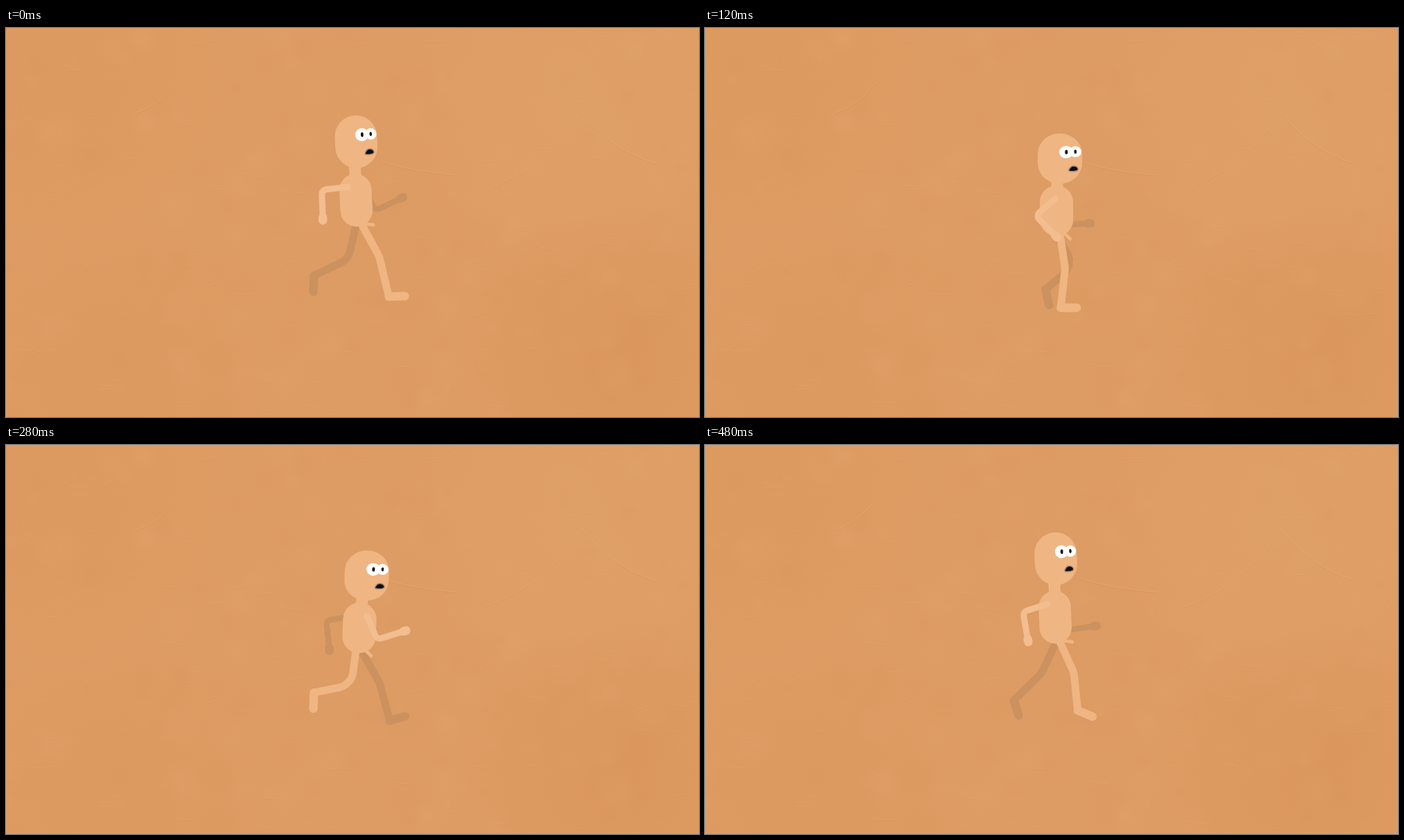
Animation of 998x561 px, one loop 0.52 s. Source, as an HTML page with a canvas:

```html
<!DOCTYPE html>
<html lang="en">
<head>
<meta charset="utf-8">
<title>Runner</title>
<style>
  html, body { margin: 0; width: 100%; height: 100%; overflow: hidden; background: #dd9b62; }
  canvas { display: block; }
</style>
</head>
<body>
<canvas id="stage" width="998" height="561"></canvas>
<script>
const W = 998, H = 561, STEPS = 13, STEP_MS = 40;
const GROUND = 403.5, THIGH = 48, SHIN = 55, UPPER_ARM = 37.5, FOREARM = 42;
const SKIN = '#efb582', ARM = '#f2be90', SHADE = '#cb9260';
const ctx = document.getElementById('stage').getContext('2d');

const rad = degrees => degrees * Math.PI / 180;
// Cosine over the run cycle that is 1 at step `peak`.
const wave = (step, peak, harmonic = 1, period = STEPS) =>
  Math.cos(2 * Math.PI * harmonic * (step - peak) / period);
// Point at a distance from [x, y]; angle 0 points down, 90 degrees forward.
const reach = ([x, y], angle, length) =>
  [x + length * Math.sin(angle), y + length * Math.cos(angle)];

// Line through two points, or two bones with a rounded joint.
function limb(points, width, color, radius = 0, cap = 'round') {
  const end = points[points.length - 1];
  ctx.beginPath();
  ctx.moveTo(...points[0]);
  if (points.length > 2) ctx.arcTo(...points[1], ...end, radius);
  ctx.lineTo(...end);
  ctx.lineWidth = width;
  ctx.lineCap = cap;
  ctx.strokeStyle = color;
  ctx.stroke();
}

function oval(x, y, rx, ry, color) {
  ctx.beginPath();
  ctx.ellipse(x, y, rx, ry, 0, 0, 2 * Math.PI);
  ctx.fillStyle = color;
  ctx.fill();
}

function capsule(w, h) {
  ctx.beginPath();
  ctx.roundRect(-w / 2, -h / 2, w, h, w / 2);
  ctx.fillStyle = SKIN;
  ctx.fill();
}

// The ankle follows a flattened loop; the knee bends forward to fit.
function leg(step, hipY, color) {
  const hip = [508.5 + 5 * wave(step, 1), hipY];
  const lift = 384.3 + 23.2 * wave(step, 2) + 10.2 * wave(step, 3.43, 2);
  const grounded = lift > GROUND;
  const ankle = [
    495.9 + 55.3 * wave(step, 0.38) + 4.1 * wave(step, 1.34, 2),
    Math.min(lift, GROUND)
  ];
  const dx = ankle[0] - hip[0], dy = ankle[1] - hip[1], d = Math.hypot(dx, dy);
  const stretch = Math.max(1, d / (THIGH + SHIN));
  const cosine = (THIGH ** 2 + d * d - SHIN ** 2) / (2 * THIGH * d);
  const bend = Math.max(0.14, Math.acos(Math.min(1, cosine)));
  const knee = reach(hip, Math.atan2(dx, dy) + bend, THIGH * stretch);
  const pitch = grounded ? 0 : 40.8 + 59.6 * wave(step, 8.1);
  limb([hip, knee, ankle], 11, color, 25);
  limb([ankle, reach(ankle, rad(90 - pitch), 23)], 12.3, color);
}

function arm(shoulder, upper, fore, width, color) {
  const elbow = reach(shoulder, rad(upper), UPPER_ARM);
  const hand = reach(elbow, rad(fore), FOREARM);
  limb([shoulder, elbow, hand], width, color, 7);
  limb([reach(hand, rad(fore), -2), reach(hand, rad(fore), 2)], 12.5, color);
}

function head(x, top, bottom, width, lean) {
  ctx.save();
  ctx.translate(x, (top + bottom) / 2);
  ctx.scale(width / 61, (bottom - top) / 76);
  ctx.rotate(lean);
  capsule(61, 76);
  oval(8.7, -9.7, 9.7, 9.4, '#fff');
  oval(21.4, -10.2, 8.3, 8.2, '#fff');
  oval(9, -9.8, 1.9, 3.3, '#06090f');
  oval(21.4, -10.2, 1.7, 3, '#06090f');
  ctx.beginPath();
  ctx.moveTo(12, 17.6);
  ctx.quadraticCurveTo(14.5, 11, 19, 11.2);
  ctx.quadraticCurveTo(24, 11.4, 25.2, 16);
  ctx.quadraticCurveTo(24.5, 19.3, 17.5, 19.3);
  ctx.quadraticCurveTo(12, 19.5, 12, 17.6);
  ctx.fillStyle = '#04101f';
  ctx.fill();
  ctx.lineWidth = 1.5;
  ctx.strokeStyle = '#b08560';
  ctx.stroke();
  ctx.restore();
}

function makePaper() {
  const paper = document.createElement('canvas');
  paper.width = W;
  paper.height = H;
  const p = paper.getContext('2d');
  let seed = 7;
  const random = () => (seed = seed * 16807 % 2147483647) / 2147483647;

  p.fillStyle = '#dd9c63';
  p.fillRect(0, 0, W, H);
  const blotch = (x, y, r, rgb, alpha) => {
    const g = p.createRadialGradient(x, y, 0, x, y, r);
    g.addColorStop(0, `rgba(${rgb},${alpha})`);
    g.addColorStop(1, `rgba(${rgb},0)`);
    p.fillStyle = g;
    p.fillRect(x - r, y - r, 2 * r, 2 * r);
  };
  blotch(840, 110, 280, '226,166,110', 0.4);
  blotch(880, 470, 220, '214,140,84', 0.4);
  blotch(60, 60, 260, '219,150,91', 0.4);
  blotch(150, 500, 230, '217,147,90', 0.3);
  const tones = ['229,171,116', '211,142,86'];
  for (let i = 0; i < 200; i++) {
    blotch(random() * W, random() * H, 8 + random() * 32, tones[i % 2], 0.1);
  }

  const crease = (x, y, dx, dy, rgb, alpha) => {
    p.beginPath();
    p.moveTo(x, y);
    p.quadraticCurveTo(x + dx * 0.4, y + dy * 0.75, x + dx, y + dy);
    p.strokeStyle = `rgba(${rgb},${alpha})`;
    p.stroke();
  };
  const fold = (x, y, dx, dy, alpha) => {
    crease(x, y, dx, dy, '235,184,132', alpha);
    crease(x, y + 1.5, dx, dy, '196,130,78', alpha * 0.7);
  };
  for (let i = 0; i < 160; i++) {
    fold(random() * W, random() * H, 8 + random() * 30, random() * 24 - 16, 0.12);
  }
  fold(830, 121, 105, 74, 0.35);
  fold(830, 121, -140, 112, 0.25);
  fold(246, 78, -60, 45, 0.3);
  fold(540, 192, 110, 20, 0.3);
  return paper;
}
const paper = makePaper();

function draw(step) {
  // 0 is upright, 1 fully squashed; the body drops twice per run cycle.
  const drop = 0.31 + 0.58 * wave(step, 2, 1, 6) + 0.09 * wave(step, 2, 2, 6);
  const swing = wave(step, 0);
  const lean = rad(-2.5 * swing);
  const bodyTop = 211 + 29 * drop, bodyBottom = 287 + 24 * drop;
  const headTop = 127 + 45 * drop, headBottom = 203 + 39 * drop;
  const hipY = bodyBottom - 2, shoulderY = 230 + 29 * drop;

  ctx.drawImage(paper, 0, 0);
  arm([506 + 8 * swing, shoulderY + 1],
    -24 + 58 * wave(step, 0.9), 63 + 58 * wave(step, 0.9), 8.5, SHADE);
  leg((step + 7) % STEPS, hipY + 2, SHADE);

  leg(step, hipY, SKIN);
  const tab = [518, bodyBottom - 4];
  limb([tab, reach(tab, rad(80 - 63 * drop), 11)], 5, SKIN);

  limb([[507.5 - 4 * swing, bodyTop + 8], [508 - 6 * swing, headBottom - 8]],
    17, SKIN, 0, 'butt');
  ctx.save();
  ctx.translate(506.5 - 2.5 * swing, (bodyTop + bodyBottom) / 2);
  ctx.rotate(lean);
  capsule(46.5 + 3 * drop, bodyBottom - bodyTop);
  ctx.restore();

  head(512 - 7.7 * swing, headTop, headBottom, 61 + 5 * drop, lean);
  arm([506 - 14 * swing, shoulderY],
    -31 - 54 * wave(step, 0.45), 55 - 53 * wave(step, 0.15), 9, ARM);
}

function tick() {
  draw(Math.floor(performance.now() / STEP_MS) % STEPS);
  requestAnimationFrame(tick);
}
tick();
</script>
</body>
</html>
```
